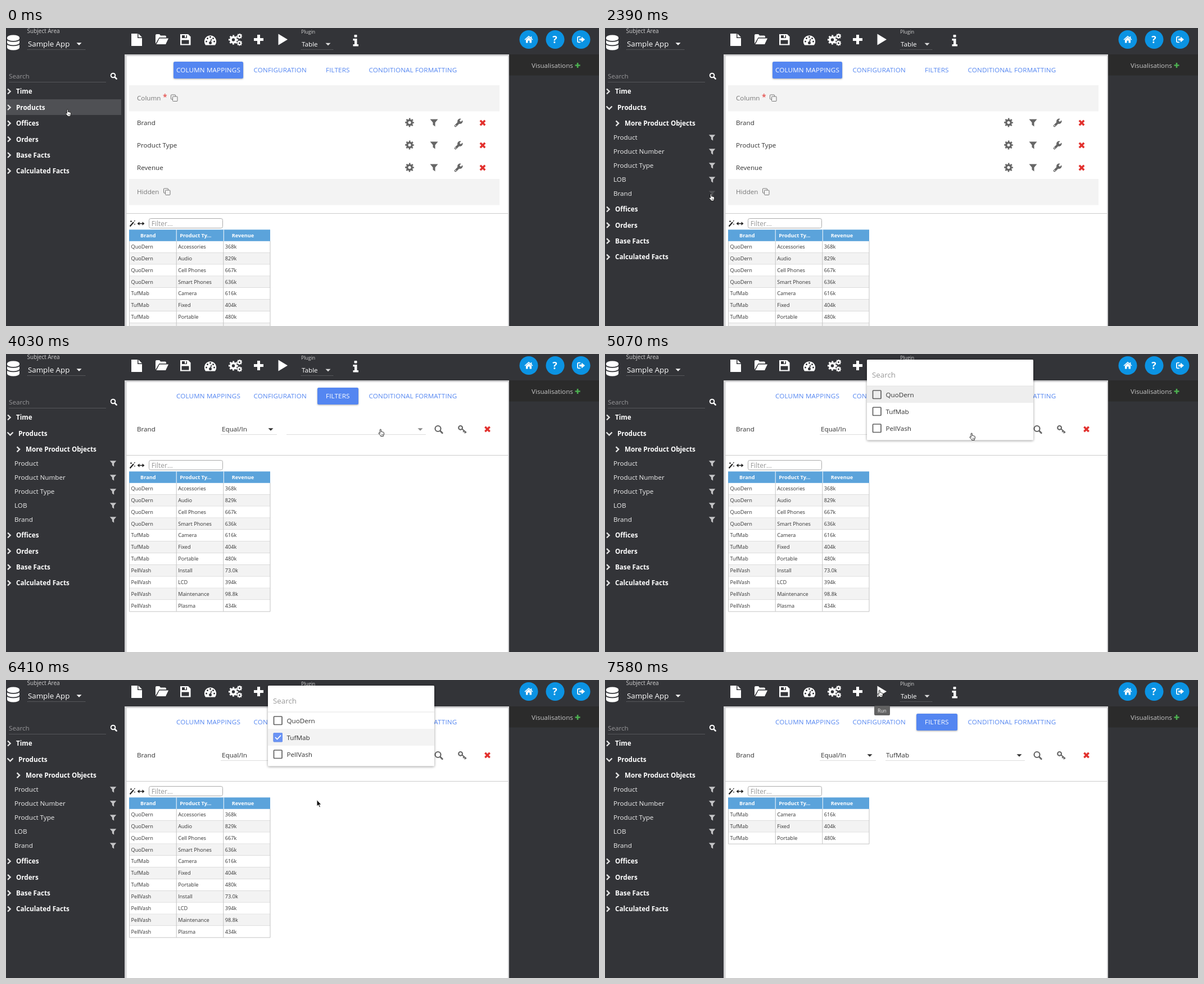
An HTML page for the animation above (8 s loop, 1055 px wide and 531 px high).

```html
<!DOCTYPE html>
<html lang="en">
<head>
<meta charset="utf-8">
<title>Filter by column</title>
<style>
html, body { margin: 0; width: 100%; height: 100%; overflow: hidden; background: #333438; }
svg { display: block; width: 1055px; height: 531px; font-family: "Open Sans", "Noto Sans", sans-serif; }
</style>
</head>
<body>
<svg id="stage" viewBox="0 0 1055 531" xmlns="http://www.w3.org/2000/svg"></svg>
<script>
const DARK = '#333438', BLUE = '#5486f1', GREY = '#666', RED = '#e2302d', BODY = 11.667;
const BRANDS = ['QuoDern', 'TufMab', 'PellVash'];
const SALES = [
  [0, 'Accessories', '368k'], [0, 'Audio', '829k'], [0, 'Cell Phones', '667k'],
  [0, 'Smart Phones', '636k'], [1, 'Camera', '616k'], [1, 'Fixed', '404k'],
  [1, 'Portable', '480k'], [2, 'Install', '73.0k'], [2, 'LCD', '394k'],
  [2, 'Maintenance', '98.8k'], [2, 'Plasma', '434k']
];

// Basic shapes
const text = (x, y, s, fill = '#333', size = BODY, more = '') =>
  `<text x="${x}" y="${y}" fill="${fill}" font-size="${size}" ${more}>${s}</text>`;
const bold = (x, y, s, fill = '#fff', size = BODY) => text(x, y, s, fill, size, 'font-weight="700"');
const rect = (x, y, w, h, fill, more = '') =>
  `<rect x="${x}" y="${y}" width="${w}" height="${h}" fill="${fill}" ${more}/>`;
const path = (d, fill, more = '') => `<path d="${d}" fill="${fill}" ${more}/>`;
const line = (d, color, w = 1, more = '') => path(d, 'none', `stroke="${color}" stroke-width="${w}" ${more}`);
const disc = (x, y, r, fill, more = '') => `<circle cx="${x}" cy="${y}" r="${r}" fill="${fill}" ${more}/>`;
const at = (x, y, s) => `<g transform="translate(${x} ${y})">${s}</g>`;
const group = (id, s) => `<g id="${id}">${s}</g>`;

// Icons, drawn around their centre
const caret = (x, y, fill, w = 4.5) => path(`M${x - w} ${y - w / 2}h${2 * w}l${-w} ${w}z`, fill);
const funnel = (x, y, fill, k = 1) =>
  `<g transform="translate(${x} ${y}) scale(${k})">${path('M-7-6.5h14l-5 6v7l-4-3v-4z', fill)}</g>`;
const cross = (x, y) => at(x, y, line('M-4.2-4.2L4.2 4.2M4.2-4.2L-4.2 4.2', RED, 3.5));
const plus = (x, y, r, w, fill) => at(x, y, line(`M${-r} 0H${r}M0 ${-r}V${r}`, fill, w));
const lens = (x, y, r, w, fill) => at(x, y,
  disc(-1, -1, r, 'none', `stroke="${fill}" stroke-width="${w}"`) +
  line(`M${r * 0.6} ${r * 0.6}L${r * 1.35} ${r * 1.35}`, fill, w * 1.3, 'stroke-linecap="round"'));
function gear(x, y, r, fill) {
  const tooth = 2 * Math.PI * r * 0.85 / 16;
  return at(x, y, disc(0, 0, r * 0.55, 'none', `stroke="${fill}" stroke-width="${r * 0.45}"`) +
    disc(0, 0, r * 0.85, 'none', `stroke="${fill}" stroke-width="${r * 0.32}" stroke-dasharray="${tooth}" stroke-dashoffset="${tooth / 2}"`));
}
const wrench = (x, y) => at(x, y,
  line('M-5.3 5.3L1 -1', GREY, 4, 'stroke-linecap="round"') + disc(2.8, -2.8, 4.7, GREY) +
  line('M3 -3L8 -8', '#fff', 3.4) + disc(-5, 5, 0.9, '#fff'));
const key = (x, y) => at(x, y,
  disc(-3.4, -2.6, 3.4, 'none', `stroke="${GREY}" stroke-width="2.2"`) +
  line('M-.8 -.6L7 6M3 3l-1.8 2M5.6 5l-1.8 2', GREY, 2));
const copy = (x, y) => at(x, y,
  rect(-5.5, -5.5, 8, 8, 'none', 'stroke="#777" rx="1"') + rect(-2.5, -2.5, 8.5, 8.5, '#f3f3f3', 'stroke="#777" rx="1"'));
const chevron = (x, y) => line(`M${x} ${y - 4.5}l4.6 4.5l-4.6 4.5`, '#e4e4e4', 2.4);

function toolbar() {
  const W = '#fff';
  const database = path('M2 17v18a11 4.5 0 0 0 22 0v-18a11 4.5 0 0 0-22 0z', W) +
    line('M1.5 19.5a11.5 4.4 0 0 0 23 0M1.5 27a11.5 4.4 0 0 0 23 0', DARK, 1.8);
  const file = path('M223 10h11v8h8v14h-19z', W) + path('M235.5 10l6.5 6.5h-6.5z', W);
  const folder = path('M266 28V13q0-2 2-2h5l2 2.5h8q2 0 2 2v1.5h-12.500z', W) +
    path('M273 18.500h16l-5 10.500h-16.500z', W);
  const floppy = path('M310 11h14l4.500 4.500V30.500H310z', W) +
    rect(313, 13, 9, 5, DARK) + rect(318, 13, 2.5, 4, W) + rect(312.5, 21.5, 13, 7, DARK);
  const dial = at(363.5, 21.5, path('M-8.500 9A10.700 10.700 0 1 1 8.500 9z', W) +
    [[-7, 2.5], [-5, -3], [0, -5.5], [5, -3], [7, 2.5]].map(p => disc(...p, 1.5, DARK)).join('') +
    line('M0 5L2 -2', DARK, 1.6) + disc(0, 5, 2.5, DARK));
  const info = rect(619.5, 12, 5, 4.5, W, 'rx="1"') + path('M617.500 19h7v10h2.500v3.500h-9.500v-3.500h2.500v-6.500h-2.500z', W);
  const buttons = [930, 977, 1023].map(x => disc(x, 20.5, 16.5, '#0b93e3')).join('');
  const home = at(930, 20.5, path('M0-4L5 .5V6H1.500V2h-3v4H-5V.5z', W) + line('M-7 .5L0-5.700L7 .5M4.500-5.500v4', W, 1.6));
  const exit = at(1023, 20.5, line('M-1-4.800h-3.500q-1.500 0-1.500 1.500v6.600q0 1.500 1.500 1.500h3.500', W, 1.8) +
    path('M-3-1.800h4v-3.200l6 5l-6 5v-3.200h-4z', W));
  return database + text(37.5, 9, 'Subject Area', '#d0d0d0', 10) + text(39, 33, 'Sample App', W, 13.333) +
    caret(130, 28.5, W) + line('M38 38.500H141', '#77787b', 1, 'stroke-dasharray="1 1"') +
    file + folder + floppy + dial + gear(404.5, 21, 8.5, W) + gear(415.5, 14.5, 4.8, W) + gear(415.5, 27, 4.8, W) +
    plus(449.5, 20.5, 8.5, 5, W) + path('M484.500 10.500L501 20.500L484.500 30.500z', W) +
    text(525, 10.3, 'Plugin', '#d0d0d0', 8.75) + text(526, 33, 'Table', W) + caret(573, 29, '#ddd') +
    line('M525 38.500H583', '#77787b', 1, 'stroke-dasharray="1 1"') +
    info + buttons + home + bold(972.3, 26.8, '?', W, 17.5) + exit;
}

function sidebar() {
  const top = (s, y) => chevron(3, y) + bold(18, y + 4.4, s);
  const rest = ['Offices', 'Orders', 'Base Facts', 'Calculated Facts'];
  const tail = y0 => rest.map((s, i) => top(s, y0 + i * 28.35)).join('');
  const fields = ['Product', 'Product Number', 'Product Type', 'LOB', 'Brand'].map((s, i) =>
    text(15, 198.7 + i * 25, s, '#f0f0f0') +
    `<g id="field${i}">${funnel(190.5, 195.5 + i * 25, '#c4c4c6', 0.82)}</g>`).join('');
  return text(5, 90, 'Search', '#97979a') + line('M5 96.500H178', '#55565a') + lens(191.5, 85.5, 3.8, 2, '#fff') +
    rect(0, 127, 205, 28, '#4f5054', 'id="hover"') + top('Time', 113) +
    group('closed', top('Products', 141.5) + tail(169.8)) +
    group('open', line('M2.500 139.500l5 5l5-5', '#e4e4e4', 2.4) + bold(22, 146, 'Products') +
      chevron(19.5, 169.8) + bold(35, 174.2, 'More Product Objects') + fields + tail(323));
}

function tabs(active) {
  const list = [['COLUMN MAPPINGS', 303, 298, 124], ['CONFIGURATION', 440.5], ['FILTERS', 569, 554, 73], ['CONDITIONAL FORMATTING', 645.5]];
  return list.map(([s, x, bx, bw], i) =>
    (i === active ? rect(bx, 60, bw, 30, BLUE, 'rx="2.500" style="filter:drop-shadow(0 1px 1.500px #0005)"') : '') +
    text(x, 79.2, s, i === active ? '#fff' : BLUE, BODY, 'letter-spacing=".14"')).join('');
}

function mappings() {
  const band = (s, y, x) => rect(219, y, 659, 46.5, '#f3f3f3') + text(233, y + 26.5, s, '#777') + copy(x, y + 22.5);
  const row = (s, i) => {
    const y = 169 + i * 40;
    return text(233, y + 4.3, s) + gear(718, y - 0.5, 7.8, GREY) + funnel(761.5, y, GREY) + wrench(805, y) + cross(848, y);
  };
  return tabs(0) + band('Column', 102, 299) + text(279, 128, '*', RED, 14) +
    ['Brand', 'Product Type', 'Revenue'].map(row).join('') + band('Hidden', 269, 286);
}

function filters() {
  return rect(298, 60, 124, 30, '#f2f5fe', 'id="fade" rx="2.500"') + tabs(2) + text(233, 138.3, 'Brand') +
    text(384, 137.6, 'Equal/In') + caret(471, 134.5, '#333') + line('M382 143.500H482', '#ddd') +
    group('idle', caret(737, 134.5, '#888') + line('M499 143.500H747', '#ddd')) +
    group('focus', caret(737, 134.5, '#333') + line('M499 143H747', BLUE, 2)) +
    group('chosen', caret(737, 134.5, '#333') + line('M499 143.500H747', '#ddd')) +
    group('value', text(500, 137.6, BRANDS[1])) +
    lens(769.5, 134, 5, 2.2, GREY) + key(812, 134) + cross(856.5, 134);
}

function grid(rows) {
  const H = 20.85, top = 379.6, xs = [219.5, 303.2, 386.8, 470];
  const bottom = top + rows.length * H;
  const cells = rows.map(([b, type, sum], i) => {
    const y = top + i * H;
    return rect(219.5, y, 250.5, H, i % 2 ? '#f3f3f3' : '#fff') +
      [BRANDS[b], type, sum].map((s, j) => text(xs[j] + 3, y + 13.4, s, '#333', 9.167)).join('') +
      line(`M219.500 ${y + H}H470`, '#c4c4c4');
  }).join('');
  return cells + line(xs.map(x => `M${x} ${top}V${bottom}`).join(''), '#c4c4c4') +
    rect(219, 359.3, 251, 20.5, '#5ba3db') + line('M303.200 359.300v20.500M387.300 359.300v20.500', '#fff') +
    bold(239, 372.8, 'Brand', '#fff', 9.167) + bold(309.3, 372.8, 'Product Ty...', '#fff', 9.167) +
    bold(401.8, 372.8, 'Revenue', '#fff', 9.167);
}

function result() {
  return line('M214 330.500H893', '#ccc') + line('M220.500 353.500L227 346', '#222', 2.2) +
    line('M228 344.500l1.500-1.500M222.500 343v3M221 344.500h3M229 348.500v2.500', '#222', 1.1) +
    line('M235 348.500H245', '#222', 1.5) + path('M233.500 348.500l4-3.200v6.400zM246.500 348.500l-4-3.200v6.400z', '#222') +
    rect(254.5, 339.5, 131, 17, '#fff', 'rx="3" stroke="#aaa"') + text(258.7, 352.6, 'Filter...', '#999', 12.1) +
    group('allRows', grid(SALES)) + group('someRows', grid(SALES.filter(r => r[0] === 1)));
}

function menu() {
  const item = (s, i) => rect(476.5, 65 + i * 30, 14.5, 14.5, 'none', 'rx="1" stroke="#606060" stroke-width="1.700"') +
    text(499.5, 76.5 + i * 30, s);
  return rect(466, 10, 296, 143.5, '#fff', 'rx="1.500" style="filter:drop-shadow(0 1px 2px #0006)"') +
    text(475, 41.5, 'Search', '#999', 13.333) + rect(466, 57, 296, 30, '#eee', 'id="pick"') +
    line('M466 57H762', '#e4e4e4') + BRANDS.map(item).join('') +
    group('tick', rect(475.5, 94, 16.5, 16.5, '#6a93f4', 'rx="1.500"') + line('M479 102.200l3.400 3.400l6.600-7', '#fff', 1.7));
}

const hand = path('M3.300 8V1.700a1.050 1.050 0 0 1 2.100 0V5q1-.7 1.700.3q1.100-.5 1.600.5q1.400-.3 1.700 1V9.400q-.2 1.500-1 2.400V13H4.600V12Q2.900 10.500 1.200 8.300q-.6-1.200.4-1.400q.9 0 1.700 1.100z',
  '#fff', 'stroke="#111" stroke-width=".9" stroke-linejoin="round"') + line('M6 9v2.300M7.400 9v2.300M8.800 9v2.300', '#333', 0.6);
const arrow = path('M6 0V11.500L8.700 9.200L10.500 13.500L12.400 12.700L10.600 8.600H14z', '#111', 'stroke="#fff" stroke-width=".9"');

document.getElementById('stage').innerHTML =
  rect(0, 0, 1055, 531, DARK) + toolbar() + sidebar() +
  rect(895, 47, 160, 37.5, '#2b2b2b') + text(935, 71, 'Visualisations', '#c6c6c6') + plus(1017, 66.5, 4.5, 2.6, '#4caf50') +
  rect(211, 47, 684, 484, '#d3d3d5') + rect(214.5, 50, 678.5, 481, '#fff') +
  group('mappings', mappings()) + group('filters', filters()) + group('result', result()) +
  group('menu', menu()) +
  group('tip', rect(479, 46, 28, 17, '#626262', 'rx="2"') + text(485, 57.5, 'Run', '#eee', 8.5)) +
  group('cursor', group('hand', hand) + group('arrow', arrow));

const parts = {};
document.querySelectorAll('[id]').forEach(el => parts[el.id] = el);
const show = (id, on) => parts[id].setAttribute('visibility', on ? 'inherit' : 'hidden');

// Pointer stops: time, x, y
const ROUTE = [
  [780, 111, 151], [930, 104, 165], [1080, 92, 196], [1230, 88, 238], [1380, 106, 278], [1520, 143, 304],
  [1669, 167, 301], [1960, 184, 301], [2110, 187, 300], [2400, 193, 303], [2852, 193, 303], [3000, 260, 285],
  [3295, 450, 235], [3590, 645, 172], [3738, 677, 156], [3886, 671, 146], [4033, 668, 140], [4920, 668, 140],
  [5068, 654, 147], [5364, 570, 120], [5660, 512, 103], [5960, 508, 103], [6103, 514, 112], [6250, 538, 170],
  [6398, 553, 220], [6550, 553, 220], [6843, 470, 125], [6990, 430, 72], [7138, 456, 38], [7286, 487, 26], [7434, 490, 24]
];
const STEP = 147.8;

function pointer(t) {
  const s = 930 + Math.floor((t - 930 + 14) / STEP) * STEP;
  const i = ROUTE.findIndex(p => p[0] > s);
  if (i < 1) return (i ? ROUTE[ROUTE.length - 1] : ROUTE[0]).slice(1);
  const [a, b] = [ROUTE[i - 1], ROUTE[i]];
  const k = (s - a[0]) / (b[0] - a[0]);
  return [a[1] + (b[1] - a[1]) * k, a[2] + (b[2] - a[2]) * k];
}

function render(t) {
  const within = (a, b) => t >= a && t < b;
  const page = t >= 2690;
  show('closed', t < 600);
  show('open', t >= 600);
  parts.hover.setAttribute('opacity', Math.max(0, Math.min(1, (1230 - t) / 300)));
  parts.field4.setAttribute('opacity', within(2240, 2990) ? 0.2 : 1);

  show('mappings', !page);
  show('filters', page);
  show('fade', within(2690, 2990));
  show('idle', page && t < 4630);
  show('focus', within(4630, 7430));
  show('chosen', t >= 7430);
  show('value', t >= 6690);
  parts.result.setAttribute('transform', `translate(0 ${page ? -150 : 0})`);
  show('allRows', t < 7580);
  show('someRows', t >= 7580);

  const onSecond = t >= 5360;
  show('menu', within(4930, 6690));
  parts.pick.setAttribute('y', onSecond ? 87 : 57);
  parts.pick.setAttribute('fill', onSecond ? '#f3f3f3' : '#eee');
  show('tick', within(5820, 6690));
  show('tip', t >= 7430);

  const [x, y] = pointer(t);
  const plain = within(2976, 3720) || within(6236, 7124);
  parts.cursor.setAttribute('transform', `translate(${x - 6} ${y - 6.5})`);
  show('hand', !plain);
  show('arrow', plain);
}

function tick(now) {
  render(now % 8000);
  requestAnimationFrame(tick);
}
render(0);
requestAnimationFrame(tick);
</script>
</body>
</html>
```
